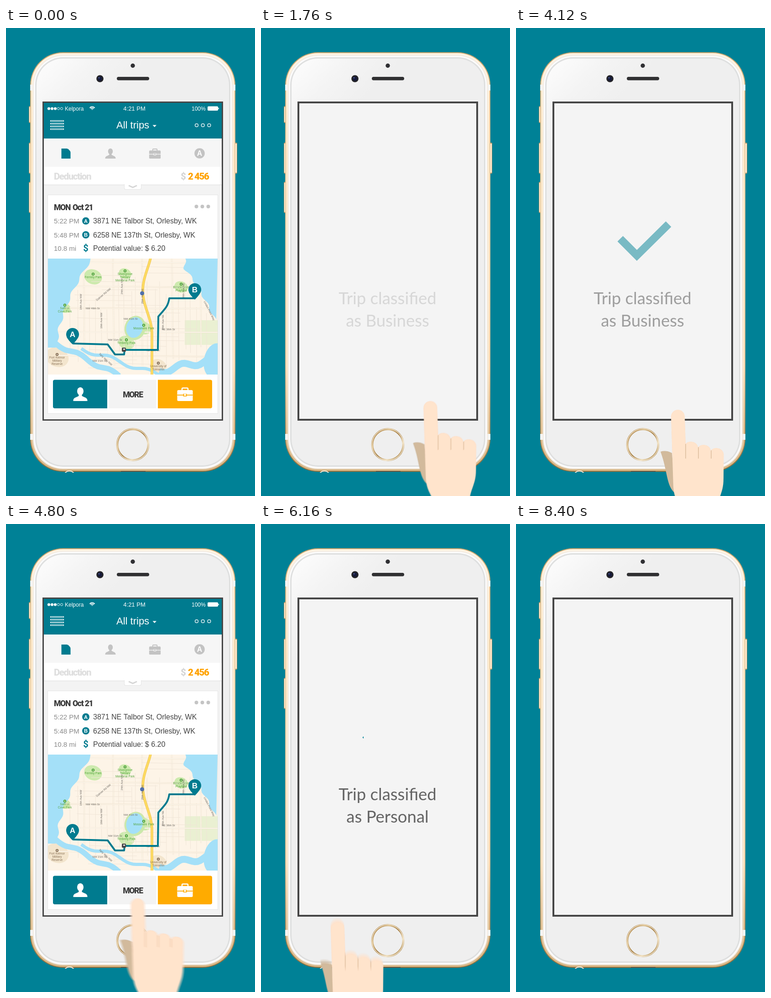
Write an HTML page with a canvas that moves like this. It is 546 px wide and 1025 px high and loops after 8440 ms.

```html
<!DOCTYPE html>
<html lang="en">
<head>
<meta charset="utf-8">
<title>Trip sorting</title>
<style>
html, body { margin: 0; width: 100%; height: 100%; overflow: hidden; background: #008196; }
canvas { display: block; width: 100vw; height: 100vh; }
</style>
</head>
<body>
<canvas id="stage"></canvas>
<script>
const W = 546, H = 1025, LOOP = 8440, STEP = 40;
const BACK = '#008196', TEAL = '#007b8f', ORANGE = '#ffab00', SKIN = '#ffdec5';
const SANS = '"Liberation Sans", Arial, sans-serif';
const HEAVY = 'Roboto, "Liberation Sans", sans-serif';
const dpr = window.devicePixelRatio || 1;
const { PI, sin, cos, min, max } = Math;

function makeCanvas(el) {
  el.width = W * dpr;
  el.height = H * dpr;
  const c = el.getContext('2d');
  c.scale(dpr, dpr);
  return c;
}
const stage = makeCanvas(document.getElementById('stage'));
const blur = makeCanvas(document.createElement('canvas'));

function layer(paint) {
  const el = document.createElement('canvas');
  paint(makeCanvas(el));
  return el;
}

const clamp = v => max(0, min(1, v));
const span = (t, a, b) => clamp((t - a) / (b - a));
const mix = (a, b, p) => a + (b - a) * p;
const range = n => [...Array(n).keys()];

// Drawing helpers
function rect(c, x, y, w, h, color) {
  c.fillStyle = color;
  c.fillRect(x, y, w, h);
}
function round(c, x, y, w, h, r, color) {
  c.fillStyle = color;
  c.beginPath();
  c.roundRect(x, y, w, h, r);
  c.fill();
}
function oval(c, x, y, rx, ry, color, angle = 0) {
  c.fillStyle = color;
  c.beginPath();
  c.ellipse(x, y, rx, ry, angle, 0, 7);
  c.fill();
}
const disc = (c, x, y, r, color) => oval(c, x, y, r, r, color);
function ring(c, x, y, r, width, color) {
  c.strokeStyle = color;
  c.lineWidth = width;
  c.beginPath();
  c.arc(x, y, r, 0, 7);
  c.stroke();
}
function trace(c, pts) {
  c.beginPath();
  pts.forEach(p => c.lineTo(...p));
}
function line(c, pts, color, width) {
  trace(c, pts);
  c.strokeStyle = color;
  c.lineWidth = width;
  c.stroke();
}
function shape(c, pts, color) {
  trace(c, pts);
  c.fillStyle = color;
  c.fill();
}
function text(c, str, x, y, font, color, align = 'left', spacing = 0) {
  c.font = font;
  c.fillStyle = color;
  c.textAlign = align;
  c.letterSpacing = spacing + 'px';
  c.fillText(str, x, y);
  c.letterSpacing = '0px';
}
function heavy(c, str, x, y, size, color, align) {
  text(c, str, x, y, `900 ${size}px ${HEAVY}`, color, align, -size * .07);
}
function gradient(c, x0, y0, x1, y1, ...colors) {
  const g = c.createLinearGradient(x0, y0, x1, y1);
  colors.forEach((color, i) => g.addColorStop(i / (colors.length - 1), color));
  return g;
}

// Icons
function person(c, x, y, s, color) {
  c.save();
  c.translate(x, y);
  c.scale(s, s);
  oval(c, 0, -6.5, 7, 8.8, color);
  rect(c, -3.5, -1, 7, 8, color);
  c.beginPath();
  c.moveTo(-15.5, 15);
  c.bezierCurveTo(-16, 7, -9, 7.5, -4, 4);
  c.lineTo(4, 4);
  c.bezierCurveTo(9, 7.5, 16, 7, 15.5, 15);
  c.fill();
  c.restore();
}
function briefcase(c, x, y, s, color, gap) {
  c.save();
  c.translate(x, y);
  c.scale(s, s);
  c.strokeStyle = color;
  c.lineWidth = 2.6;
  c.beginPath();
  c.roundRect(-6.5, -13.5, 13, 7, 2);
  c.stroke();
  round(c, -17, -9, 34, 24, 2.5, color);
  rect(c, -17, 1, 34, 1.8, gap);
  round(c, -4, -1, 8, 6, 1, gap);
  round(c, -2.2, -.5, 4.4, 4, 1, color);
  c.restore();
}
function badge(c, x, y, r, letter, color) {
  disc(c, x, y, r, color);
  text(c, letter, x, y + r * .5, `bold ${r * 1.4}px ${SANS}`, '#fff', 'center');
}
function pin(c, x, y, letter) {
  c.beginPath();
  c.arc(x, y, 14, PI * .86, PI * .14);
  c.quadraticCurveTo(x + 9, y + 13, x, y + 22);
  c.quadraticCurveTo(x - 9, y + 13, x - 13, y + 6);
  c.fillStyle = TEAL;
  c.fill();
  text(c, letter, x, y + 6, `bold 17px ${SANS}`, '#fff', 'center');
}

function drawPhone(c) {
  rect(c, 0, 0, W, H, BACK);
  const key = (x, y, h) => {
    round(c, x, y, 5, h, 2, '#b99a6b');
    round(c, x + 1, y + 2, 3, h - 4, 1, '#fdebd2');
  };
  key(50, 171, 37);
  key(50, 251, 68);
  key(50, 337, 68);
  key(502, 251, 68);

  const shell = (inset, color) =>
    round(c, 53 + inset, 53 + inset, 450 - inset * 2, 919 - inset * 2, 72 - inset, color);
  shell(0, gradient(c, 0, 53, 0, 972, '#c9a36c', '#e9cb9f', '#e9cb9f', '#e3c397', '#97703a'));
  shell(2, gradient(c, 0, 55, 0, 968, '#fff4e2', '#fde9cb', '#fdecd4', '#fbe6c8', '#d9b98a'));
  for (const x of [53, 496]) for (const y of [124, 889]) rect(c, x, y, 7, 13, '#f5f4f2');
  shell(6, '#f3ece4');
  shell(8, '#fcfcfc');
  shell(11, '#dedfdf');
  shell(14, gradient(c, 80, 75, 190, 190, '#fcfcfc', '#f4f4f4', '#efefef'));

  c.save();
  c.beginPath();
  c.rect(110, 969, 210, 5);
  c.clip();
  ring(c, 139, 982, 12, 2, '#f2e8da');
  rect(c, 252, 970, 54, 2, '#69523a');
  c.restore();

  disc(c, 278, 82.5, 4.7, '#303033');
  disc(c, 206, 111, 7.8, '#232327');
  disc(c, 206, 111, 4.6, '#151a3c');
  disc(c, 204, 109, 1.6, '#49558c');
  round(c, 243, 107, 71, 7.5, 3.7, '#303032');

  ring(c, 278, 912.5, 34, 4.4,
    gradient(c, 248, 884, 308, 942, '#a57c42', '#d9bb85', '#a17a40', '#f0dfbd', '#98702f'));
  ring(c, 278, 912.5, 34.6, 1.2, '#f6ead6');

  rect(c, 80, 161, 396, 699, '#464646');
  rect(c, 84, 165, 388, 691, '#f4f4f4');
}

// Map
const WATER = '#a4e0f8', LAND = '#fdf4e7';
const westCoast = y => 112 + 76 * (1 - span(y, 505, 690)) ** 1.6 + 3 * sin(y * .16);
const eastCoast = y => 392 + 72 * span(y, 530, 650) ** .8 + 3 * sin(y * .2);
const freewayX = y => 310 - 10 * cos(PI * min(1, (y - 575) / 95));

const places = [
  { name: 'Fernley Park', x: 191, y: 548, r: 20 },
  { name: 'Saffron/Cove Park', x: 129, y: 616, r: 13 },
  { name: 'Silvergrove/Talmary/Memorial Park', x: 261, y: 541, r: 14 },
  { name: 'Brindlemoor/Playfield', x: 384, y: 570, r: 15 },
  { name: 'Mossmere Park', x: 302, y: 660, r: 17 },
  { name: 'Timberly Park', x: 264, y: 692, r: 18 },
  { name: 'Fort Kelmor/Military/Reserve', x: 112, y: 724, r: 26, town: true },
  { name: 'University of/Tolmaren', x: 334, y: 743, r: 18, town: true }
];

function drawStreets(c) {
  let seed = 7;
  const rnd = () => (seed = seed * 16807 % 2147483647) / 2147483647;
  const street = (x0, y0, x1, y1, major) => {
    line(c, [[x0, y0], [x1, y1]], major ? '#ecd9bd' : '#f1e6d8', major ? 2.6 : 1);
    if (major) line(c, [[x0, y0], [x1, y1]], '#fffdf8', 1.4);
  };
  for (const i of range(24)) {
    const x = 140 + i * 13 + rnd() * 6, major = i % 5 == 2;
    street(x, major ? 505 : 515 + rnd() * 110, x + rnd() * 3, 690 + rnd() * 55, major);
  }
  for (const i of range(24)) {
    const y = 512 + i * 10 + rnd() * 5, major = i % 5 == 0;
    const x = max(150 + rnd() * 160, westCoast(y));
    street(major ? westCoast(y) : x, y, major ? eastCoast(y) : x + 60 + rnd() * 70, y + rnd() * 3, major);
  }
}

function waterway(c, x0, y0, x1, y1, width, sway) {
  const pts = range(25).map(i => {
    const p = i / 24;
    return [mix(x0, x1, p), mix(y0, y1, p) + sway * sin(p * 4 * PI)];
  });
  line(c, pts, WATER, width);
}

function drawWater(c) {
  const ys = range(51).map(i => 500 + i * 4);
  shape(c, [[92, 500], ...ys.map(y => [westCoast(y), y]), [92, 700]], WATER);
  shape(c, [[464, 500], ...ys.filter(y => y < 655).map(y => [eastCoast(y), y])], WATER);
  oval(c, 283, 657, 23, 27, '#cbe8ab', .3);
  oval(c, 282, 656, 18, 23, WATER, .3);
  waterway(c, 108, 690, 248, 762, 12, 4);
  waterway(c, 165, 702, 335, 760, 7, 5);
  waterway(c, 336, 752, 470, 722, 15, 6);
  oval(c, 458, 728, 24, 38, WATER, .2);
}

function drawLabels(c) {
  const label = (str, x, y, angle, color, size) => {
    c.save();
    c.translate(x, y);
    c.rotate(angle);
    text(c, str, 0, 0, `${size}px ${SANS}`, color, 'center');
    c.restore();
  };
  for (const i of range(6)) {
    const [x, y] = [190 + i * 83 % 200, 616 + i * 23];
    label(`${x < 300 ? 'NW' : 'NE'} ${46 - i * 5}th St`, x, y, 0, '#6e6a64', 6);
    label(`${14 + i * 5}th Ave ${i < 3 ? 'NW' : 'NE'}`, 166 + i * 45, 600 + 45 * sin(i * 2), -PI / 2, '#6e6a64', 6);
  }
  label('Dalmer Rd NW', 215, 585, -.7, '#6e6a64', 6);
  label('Tarly Way NW', 217, 727, .75, '#6e6a64', 6);
  label('Linden Point Way', 444, 620, 1.1, '#6e6a64', 6);
  for (const { name, x, y, town } of places) {
    const color = town ? '#8b7359' : '#54a53c';
    disc(c, x, y - 9, 3.2, color);
    disc(c, x, y - 9, 1.1, '#fff');
    name.split('/').forEach((str, i) => label(str, x, y + i * 7, 0, color, 6.5));
  }
}

function drawMap(c) {
  c.save();
  c.beginPath();
  c.rect(92, 505, 372, 254);
  c.clip();
  rect(c, 92, 505, 372, 254, LAND);
  rect(c, 392, 640, 72, 54, '#eaf0d2');
  for (const { x, y, r, town } of places)
    oval(c, x, y - 3, r, r * .8, town ? '#f3e5cd' : '#cdeaae', .4);
  drawStreets(c);
  drawWater(c);

  const freeway = range(54).map(i => 500 + i * 5).map(y => [freewayX(y), y]);
  line(c, freeway, '#efc04a', 5.6);
  line(c, freeway, '#fddb62', 4);
  disc(c, 298.5, 581, 4.5, '#4b71b9');
  drawLabels(c);

  c.strokeStyle = TEAL;
  c.lineWidth = 4;
  c.lineJoin = 'round';
  trace(c, [[147, 691], [223, 693], [239, 715], [259, 715], [260, 705], [333, 705], [334, 632]]);
  c.bezierCurveTo(347, 616, 355, 612, 358, 592);
  c.lineTo(414, 592);
  c.stroke();
  round(c, 254, 700, 9, 9, 2, '#464646');
  rect(c, 257, 702, 4, 3, '#d9d9d9');
  pin(c, 146, 671, 'A');
  pin(c, 414, 573, 'B');
  c.restore();
}

function drawHeader(c) {
  rect(c, 83, 164, 390, 78, TEAL);
  for (const i of range(5)) {
    if (i < 3) disc(c, 94 + i * 7, 176.5, 3.1, '#fff');
    else ring(c, 94 + i * 7, 176.5, 2.6, .9, '#fff');
  }
  text(c, 'Kelpora', 129, 181, `12px ${SANS}`, '#fff');
  for (const r of [1, 4, 7]) {
    c.strokeStyle = '#fff';
    c.lineWidth = 2;
    c.beginPath();
    c.arc(189, 179.5, r, -PI * .78, -PI * .22);
    c.stroke();
  }
  text(c, '4:21 PM', 281.5, 181, `13px ${SANS}`, '#fff', 'center');
  text(c, '100%', 407, 181, `12px ${SANS}`, '#fff');
  round(c, 442, 171.5, 23, 9.5, 2, '#fff');
  round(c, 465.5, 174.5, 1.5, 3.5, .7, '#fff');

  c.strokeStyle = '#fff';
  c.lineWidth = 1;
  for (const i of range(4)) c.strokeRect(97.5, 202.5 + i * 6, 29, 2);
  text(c, 'All trips', 242, 220, `22px ${SANS}`, '#fff');
  shape(c, [[321.5, 212.5], [330, 212.5], [325.7, 217]], '#fff');
  for (const i of range(3)) ring(c, 418 + i * 13.7, 213, 3.4, 1.3, '#fff');
}

function drawList(c) {
  rect(c, 83, 164, 390, 693, '#f3f3f3');
  drawHeader(c);
  rect(c, 83, 242, 390, 62, '#f6f6f6');
  rect(c, 121.5, 264, 20, 22, TEAL);
  shape(c, [[134, 264], [142, 264], [142, 272]], '#f6f6f6');
  shape(c, [[135.5, 264], [135.5, 270.5], [141.5, 270.5]], TEAL);
  person(c, 229, 275, .74, '#c3c3c3');
  briefcase(c, 326.5, 275, .74, '#c3c3c3', '#f6f6f6');
  badge(c, 424.5, 274.5, 11.3, 'A', '#c3c3c3');

  rect(c, 83, 304, 390, 39, '#fff');
  rect(c, 83, 343, 390, 1, '#dedede');
  heavy(c, 'Deduction', 105, 331.5, 20.5, '#dfdfdf');
  heavy(c, '$', 383, 331.5, 20.5, '#d6d6d6');
  heavy(c, '2 456', 399, 331.5, 20.5, '#ffa200');
  round(c, 259, 342, 38, 12, [0, 0, 3, 3], '#e6e6e6');
  round(c, 260, 342, 36, 11, [0, 0, 3, 3], '#fff');
  line(c, [[269, 345], [278, 349], [287, 345]], '#d6d6d6', 3);

  rect(c, 91, 365, 374, 480, '#e4e4e4');
  rect(c, 92, 366, 372, 478, '#fff');
  heavy(c, 'MON', 105, 399, 17.5, '#3c3c3c');
  heavy(c, 'Oct 21', 146, 398.5, 17.5, '#3c3c3c');
  for (const i of range(3)) disc(c, 417.5 + i * 13, 391, 4, '#c4c4c4');
  const row = (left, right, y) => {
    text(c, left, 105, y, `15px ${SANS}`, '#8a8a8a');
    text(c, right, 191, y, `16px ${SANS}`, '#424242');
  };
  row('5:22 PM', '3871 NE Talbor St, Orlesby, WK', 428);
  row('5:48 PM', '6258 NE 137th St, Orlesby, WK', 458.5);
  row('10.8 mi', 'Potential value: $ 6.20', 488);
  badge(c, 175, 422.5, 8, 'A', TEAL);
  badge(c, 175, 453, 8, 'B', TEAL);
  text(c, '$', 175, 489, `bold 20px ${HEAVY}`, TEAL, 'center');
  drawMap(c);

  round(c, 103, 770.5, 119, 62.5, [4, 0, 0, 4], TEAL);
  rect(c, 226, 770.5, 103.5, 62.5, '#f3f3f3');
  round(c, 333, 770.5, 119, 62.5, [0, 4, 4, 0], ORANGE);
  person(c, 163, 802, 1, '#fff');
  heavy(c, 'MORE', 278, 808.5, 17.5, '#3c3c3c', 'center');
  briefcase(c, 392.5, 802, 1, '#fff', ORANGE);
}

const phone = layer(drawPhone), list = layer(drawList);

// Motion
const outCubic = p => 1 - (1 - p) ** 3;
const inOutCubic = p => p < .5 ? 4 * p ** 3 : 1 - 4 * (1 - p) ** 3;
const inOutQuad = p => p < .5 ? 2 * p * p : 1 - 2 * (1 - p) ** 2;

const stops = { below: [386, 1119], right: [354, 884], rest: [317, 927], left: [124, 880], gone: [142, 1125] };
const moves = [
  { from: 180, to: 940, a: stops.below, b: stops.right, ease: inOutQuad },
  { from: 1560, to: 2400, a: stops.right, b: stops.rest, ease: outCubic },
  { from: 4200, to: 5560, a: stops.rest, b: stops.left, ease: inOutCubic },
  { from: 5840, to: 6640, a: stops.left, b: stops.gone, ease: inOutQuad }
];
function handAt(t) {
  const m = moves.findLast(v => t >= v.from) || moves[0];
  const p = m.ease(span(t, m.from, m.to));
  return m.a.map((v, i) => mix(v, m.b[i], p));
}

const taps = [
  { from: 880, end: 1640, x: 392, button: 333, corners: [0, 4, 4, 0] },
  { from: 5340, end: 5880, x: 162, button: 103, corners: [4, 0, 0, 4] }
];
function drawTap(c, t, tap) {
  if (t < tap.from || t >= tap.end) return;
  const u = span(t, tap.from, tap.from + 540), fade = span(t, tap.end, tap.end - 160);
  const y = 801, white = alpha => `rgba(255,255,255,${alpha})`;
  round(c, tap.button, 770.5, 119, 62.5, tap.corners, `rgba(0,0,0,${.055 * fade})`);
  disc(c, tap.x, y, 52, `rgba(0,0,0,${.025 * fade})`);
  const glow = .07 * clamp(1 - u * 1.4);
  disc(c, tap.x, y, 44, white(glow));
  disc(c, tap.x, y, 30, white(glow));
  const strength = clamp((u - .15) * 2.5) * span(u, 1, .7);
  for (const k of range(3)) {
    const r = (u - .24 * k) * 70;
    if (r <= 0) continue;
    const alpha = strength * clamp(1.2 - r / 68);
    ring(c, tap.x, y, r, 10, white(alpha * .2));
    ring(c, tap.x, y, r, 3, white(alpha * .6));
  }
}

function drawHand(c, x, y) {
  c.save();
  c.translate(x, y);
  c.fillStyle = '#cbb497';
  c.beginPath();
  c.moveTo(0, 1);
  c.quadraticCurveTo(12, -3, 25, 4);
  c.lineTo(32, 92);
  c.bezierCurveTo(12, 76, 16, 44, 0, 1);
  c.fill();

  const knuckles = range(3).map(k => [55 + 28 * k, -16 + 7 * k]);
  c.fillStyle = SKIN;
  c.beginPath();
  c.moveTo(23, -75);
  c.bezierCurveTo(23, -96, 53, -96, 53, -75);
  for (const [kx, ky] of knuckles) {
    c.lineTo(kx, ky);
    c.bezierCurveTo(kx + 5, ky - 8, kx + 25, ky - 7, kx + 27.5, ky + 8);
  }
  c.lineTo(138, 60);
  c.bezierCurveTo(138, 96, 123, 100, 122, 145);
  c.lineTo(122, 240);
  c.lineTo(43, 240);
  c.lineTo(43, 128);
  c.bezierCurveTo(42, 114, 30, 108, 28, 78);
  c.closePath();
  c.fill();
  for (const [kx, ky] of knuckles) line(c, [[kx, ky], [kx, 16]], '#c9b091', 1.2);
  c.restore();
}

// Average of several moments gives the moving hand its soft edge
function drawBlurredHand(c, t) {
  const samples = 6;
  blur.clearRect(0, 0, W, H);
  blur.globalCompositeOperation = 'lighter';
  blur.globalAlpha = 1 / samples;
  for (const i of range(samples)) {
    const [x, y] = handAt(t + (i / (samples - 1) - .5) * STEP / 2);
    blur.drawImage(layerOfHand, x - 200, y - 200, W, H);
  }
  c.drawImage(blur.canvas, 0, 0, W, H);
}
const layerOfHand = layer(c => drawHand(c, 200, 200));

function drawCheck(c, p) {
  c.save();
  c.beginPath();
  c.rect(220, 420, 124 * p, 95);
  c.clip();
  c.lineJoin = 'miter';
  line(c, [[228.5, 461.5], [265, 498], [334.5, 429.5]], BACK, 17);
  c.restore();
}

function draw(t) {
  const c = stage, second = t >= 4200;
  const phase = second ? t - 4240 : t;
  c.drawImage(phone, 0, 0, W, H);

  const out = 1 - span(phase, 4080, 4160);
  const message = span(phase, 1720, 1960) * out;
  if (message > 0) {
    c.globalAlpha = message;
    const font = '36.5px Lato, "Open Sans", sans-serif';
    text(c, 'Trip classified', 277.5, 605, font, '#484848', 'center');
    text(c, second ? 'as Personal' : 'as Business', 277.5, 654, font, '#484848', 'center');
    c.globalAlpha = out;
    drawCheck(c, inOutQuad(span(phase, 1840, 2400)));
  }
  c.globalAlpha = 1 - span(phase, 1600, 1760);
  if (c.globalAlpha > 0) c.drawImage(list, 0, 0, W, H);
  c.globalAlpha = 1;

  taps.forEach(tap => drawTap(c, t, tap));
  drawBlurredHand(c, t);
}

function tick() {
  const t = performance.now() % LOOP;
  draw(Math.floor(t / STEP) * STEP);
  requestAnimationFrame(tick);
}
tick();
</script>
</body>
</html>
```
